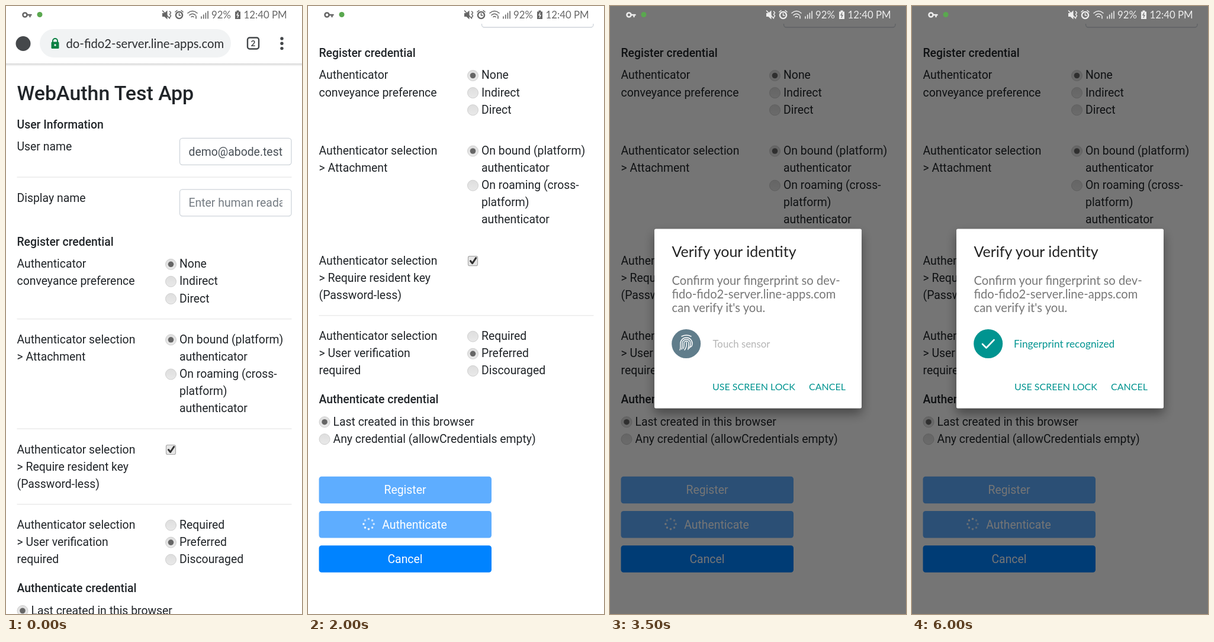
These frames come from a looping animation (500 px wide and 1027 px high, 6250 ms). An HTML page:

```html
<!DOCTYPE html>
<html lang="en">
<head>
<meta charset="utf-8">
<title>WebAuthn Test App</title>
<style>
html, body { margin: 0; width: 100%; height: 100%; overflow: hidden; background: #fff; }
svg { display: block; width: 100%; height: 100%; }
text { white-space: pre; }
.page { font: 400 19.4px Roboto, sans-serif; fill: #212529; }
.page .head { font-weight: 500; }
.page .title { font-size: 33.9px; font-weight: 500; }
.page .label { fill: #fff; text-anchor: middle; }
.ui { font-family: Lato, sans-serif; }
.line { fill: none; stroke-linecap: round; stroke-linejoin: round; }
</style>
</head>
<body>
<svg viewBox="0 0 500 1027">
  <defs>
    <clipPath id="view"><rect y="30" width="500" height="997"/></clipPath>
    <clipPath id="field"><rect x="305" y="310" width="162" height="44"/></clipPath>
    <linearGradient id="knob" x2="0" y2="1">
      <stop stop-color="#dedede"/><stop offset="1" stop-color="#e9e9e9"/>
    </linearGradient>
    <linearGradient id="edge" x2="0" y2="1">
      <stop stop-color="#d6d6d6"/><stop offset="1" stop-color="#fff"/>
    </linearGradient>
    <filter id="shadow" x="-20%" y="-20%" width="140%" height="140%">
      <feDropShadow dx="0" dy="9" stdDeviation="9" flood-opacity=".4"/>
    </filter>
  </defs>
  <rect width="500" height="1027" fill="#fff"/>
  <g clip-path="url(#view)">
    <g id="page" class="page"></g>
    <rect id="thumb" x="496" width="4" height="746" fill="#c3c3c3"/>
  </g>
  <g id="toolbar" class="ui">
    <rect y="30" width="500" height="68" fill="#fff"/>
    <rect y="97" width="500" height="5" fill="url(#edge)"/>
    <circle cx="29" cy="63.5" r="12.5" fill="#45484b"/>
    <rect x="57" y="39" width="323" height="48" rx="24" fill="#f1f3f4"/>
    <path class="line" d="M79 62v-3a4 4 0 0 1 8 0v3" stroke="#0b8043" stroke-width="2"/>
    <rect x="76.500" y="60.500" width="13" height="11.500" rx="1.500" fill="#0b8043"/>
    <circle cx="83" cy="66" r="1.700" fill="#f1f3f4"/>
    <text x="101.500" y="71" font-size="20.300" fill="#2b2d30">do-fido2-server.line-apps.com</text>
    <rect x="408" y="53.500" width="19" height="19" rx="3.500" fill="none" stroke="#44474a" stroke-width="2.400"/>
    <text x="417.500" y="68" font-size="13.500" font-weight="700" text-anchor="middle" fill="#44474a">2</text>
    <g fill="#44474a"><circle cx="466" cy="55" r="2.700"/><circle cx="466" cy="63.300" r="2.700"/><circle cx="466" cy="71.600" r="2.700"/></g>
  </g>
  <rect id="dim" width="500" height="1027"/>
  <g id="status" class="ui"></g>
  <g id="dialog" class="ui"></g>
</svg>
<script>
const $ = id => document.getElementById(id);
const LOOP = 6250, STEP = 250;
const BLUE = '#0083ff', PRESSED = '#006fe6', DISABLED = '#5eadff';
const TEAL = '#009490', ORANGE = '#ff6a1e';

const text = (x, y, s, attrs = '') => `<text x="${x}" y="${y}" ${attrs}>${s}</text>`;
const lines = (x, y, gap, list, attrs) =>
  list.map((s, i) => text(x, y + i * gap, s, attrs)).join('');
const disc = (x, y, r, fill) => `<circle cx="${x}" cy="${y}" r="${r}" fill="${fill}"/>`;
const stroke = (d, color, width) =>
  `<path class="line" d="${d}" stroke="${color}" stroke-width="${width}"/>`;

// Page content, placed in document coordinates
const GAP = 29.1;
const para = (y, ...list) => lines(18.5, y, GAP, list);
const head = (y, s) => text(18.5, y, s, 'class="head"');
const rule = (y, id) => `<rect id="${id}" x="18.5" y="${y}" width="464" height="1.2" fill="#e6e6e6"/>`;
const input = y =>
  `<rect x="293.5" y="${y}" width="188.500" height="45" rx="4.500" fill="#fff" stroke="#ced4da" stroke-width="1.300"/>`;
const radio = (x, y, on) =>
  `<circle cx="${x}" cy="${y}" r="9" fill="url(#knob)" stroke="#cfcfcf"/>` +
  (on ? disc(x, y, 4.8, '#666') : '');
const option = (y, on, ...list) => radio(278.5, y - 6, on) + lines(293, y, GAP, list);
const button = (id, y, s) =>
  `<rect id="${id}" x="18.5" y="${y}" width="291.500" height="45.500" rx="4.500"/>` +
  text(164, y + 29.8, s, `id="${id}Text" class="label"`);

$('page').innerHTML = [
  text(18.5, 159, 'WebAuthn Test App', 'class="title"'),
  head(206.5, 'User Information'),
  para(244, 'User name'), input(223.3),
  text(308.5, 252.5, 'demo@abode.test', 'fill="#495057"'),
  rule(288.5, 'rule0'),
  para(330.5, 'Display name'), input(309.8),
  `<g clip-path="url(#field)">${text(308.5, 339, 'Enter human readable name', 'fill="#767d84"')}</g>`,
  head(404.5, 'Register credential'),
  para(442.3, 'Authenticator', 'conveyance preference'),
  option(442.3, true, 'None'), option(471.4, false, 'Indirect'), option(500.5, false, 'Direct'),
  rule(528, 'rule1'),
  para(569.8, 'Authenticator selection', '&gt; Attachment'),
  option(569.8, true, 'On bound (platform)', 'authenticator'),
  option(628, false, 'On roaming (cross-', 'platform)', 'authenticator'),
  rule(713.5, 'rule2'),
  para(755.7, 'Authenticator selection', '&gt; Require resident key', '(Password-less)'),
  '<rect x="270.500" y="741.500" width="16" height="16" rx="2.500" fill="#e6e6e6" stroke="#a9a9a9" stroke-width="1.200"/>',
  stroke('M274.5 749.5l3.2 4 6-9', '#333', 3),
  rule(841, 'rule3'),
  para(883, 'Authenticator selection', '&gt; User verification', 'required'),
  option(883, false, 'Required'), option(912.1, true, 'Preferred'), option(941.2, false, 'Discouraged'),
  head(989.8, 'Authenticate credential'),
  radio(28, 1021.500, true), text(42.5, 1027.8, 'Last created in this browser'),
  radio(28, 1050.500, false), text(42.5, 1056.9, 'Any credential (allowCredentials empty)'),
  button('reg', 1113.5, 'Register'),
  button('auth', 1171.8, 'Authenticate'),
  button('cancel', 1230, 'Cancel'),
  '<g id="spinner" fill="#fff"></g>'
].join('');
$('cancel').setAttribute('fill', BLUE);

function drawStatus(color) {
  let bars = '';
  for (let i = 0; i < 4; i++) bars += `M${330 + i * 3.7} 21v${-3 - i * 3}`;
  $('status').innerHTML =
    `<g fill="${color}">` +
    '<path d="M264 12h3.500l5-4.500v15l-5-4.500h-3.500z"/>' +
    '<path d="M387 9.500h2.500v-2h4v2h2.500v12.500h-9z"/>' +
    text(347, 21, '92%', 'font-size="16.800"') +
    text(401.5, 21, '12:40 PM', 'font-size="16.800"') + '</g>' +
    `<circle cx="32" cy="15" r="3.500" fill="none" stroke="${color}" stroke-width="2.600"/>` +
    stroke('M36 15h6.500M40.500 15v3', color, 2.5) +
    disc(57, 14.5, 4.5, '#5aa84f') +
    stroke('M264.500 8l12 13', color, 1.6) +
    stroke('M276.500 9l2 2.500-2 2.500 2 2.500-2 3', color, 1.5) +
    `<circle cx="292.500" cy="15.500" r="5.600" fill="none" stroke="${color}" stroke-width="2.400"/>` +
    stroke('M292.500 12.500v3.500h2.500M286 10l3-2.500M299 10l-3-2.500', color, 1.6) +
    stroke('M307 12q8-7 16 0M310 15.500q5-4.500 10 0M313 18.500q2-2 4 0M321 17v4', color, 1.6) +
    stroke(bars, color, 1.6) +
    stroke('M392 11.500l-2 4h3l-2 4', color === '#666' ? '#fff' : '#777', 1.3);
}

function drawSpinner(t) {
  let dots = '';
  for (let i = 0; i < 8; i++) {
    const a = i * Math.PI / 4;
    const age = (i - Math.floor(t / 94) % 8 + 16) % 8;
    dots += `<circle cx="${102.5 + 8.6 * Math.cos(a)}" cy="${1193.8 + 8.6 * Math.sin(a)}" r="1.800" opacity="${0.55 + age * 0.06}"/>`;
  }
  $('spinner').innerHTML = dots;
}

function fingerprint() {
  let d = 'M129 568q1 8-3 13';
  for (let r = 4; r <= 10; r += 3)
    d += `M${129 - r} ${572 + r * 0.4}q0 3-1 5M${129 - r} ${572 + r * 0.4}V570a${r} ${r} 0 0 1 ${2 * r} 0q0 5-${r * 0.3} ${13 - r * 0.7}`;
  return disc(128.7, 570.5, 24.5, '#607d8b') + stroke(d + 'M121 558q8-4 16 0', '#fff', 1.5);
}

function message(state) {
  const size = 'font-size="17.300"';
  if (state === 'error')
    return disc(128.7, 570.5, 24.5, ORANGE) + stroke('M128.700 560.500v12', '#fff', 2.6) + disc(128.7, 579.5, 1.8, '#fff') +
      lines(172, 567, 20, ['Make sure your finger covers', 'the entire sensor.'], `${size} fill="${ORANGE}"`);
  if (state === 'done')
    return disc(128.7, 570.5, 24.5, TEAL) + stroke('M119 571l6.500 6.500 13-13.500', '#fff', 2.6) +
      text(172, 577, 'Fingerprint recognized', `${size} fill="${TEAL}"`);
  return fingerprint() + text(173.5, 577, 'Touch sensor', 'font-size="16.800" fill="#b5b5b5"');
}

function drawDialog(state) {
  $('dialog').innerHTML =
    '<rect x="75" y="376.500" width="350" height="303" rx="2.500" fill="#fff" filter="url(#shadow)"/>' +
    text(104.5, 424, 'Verify your identity', 'font-size="25" fill="#222"') +
    lines(104.5, 471, 22.8, ['Confirm your fingerprint so dev-', 'fido-fido2-server.line-apps.com', 'can verify it\'s you.'],
      'font-size="20.200" fill="#777"') +
    message(state) +
    text(173, 648.5, 'USE SCREEN LOCK', `font-size="16" fill="${TEAL}"`) +
    text(336, 648.5, 'CANCEL', `font-size="16" fill="${TEAL}"`);
}

const show = (id, on) => $(id).setAttribute('display', on ? 'inline' : 'none');

function render(t) {
  const scroll = t < 500 ? 0 : t < 750 ? 230 : t < 1000 ? 308.4 : 318.8;
  const busy = t >= 1750;
  const dim = t < 2250 ? 0 : t < 2500 ? 0.28 : 0.54;

  $('page').setAttribute('transform', `translate(0 ${-scroll})`);
  show('toolbar', scroll === 0);
  show('thumb', scroll > 0 && t < 1500);
  $('thumb').setAttribute('y', 30 + (scroll - 68) * 0.747);
  for (let i = 0; i < 4; i++) show('rule' + i, t < 500 || (i === 3 && t >= 1500 && t < 2250));

  $('reg').setAttribute('fill', busy ? DISABLED : t >= 750 && t < 1000 ? PRESSED : BLUE);
  $('auth').setAttribute('fill', busy ? DISABLED : BLUE);
  $('authText').setAttribute('x', busy ? 180 : 164);
  show('spinner', busy);
  drawSpinner(t);

  $('dim').setAttribute('opacity', dim);
  drawStatus(dim ? '#ededed' : '#666');
  show('dialog', t >= 2500);
  drawDialog(t >= 5750 ? 'done' : t >= 4000 && t < 5250 ? 'error' : 'hint');
}

const start = performance.now();
let last = -1;
function tick() {
  const t = Math.floor((performance.now() - start) % LOOP / STEP) * STEP;
  if (t !== last) render(last = t);
  requestAnimationFrame(tick);
}
tick();
</script>
</body>
</html>
```
